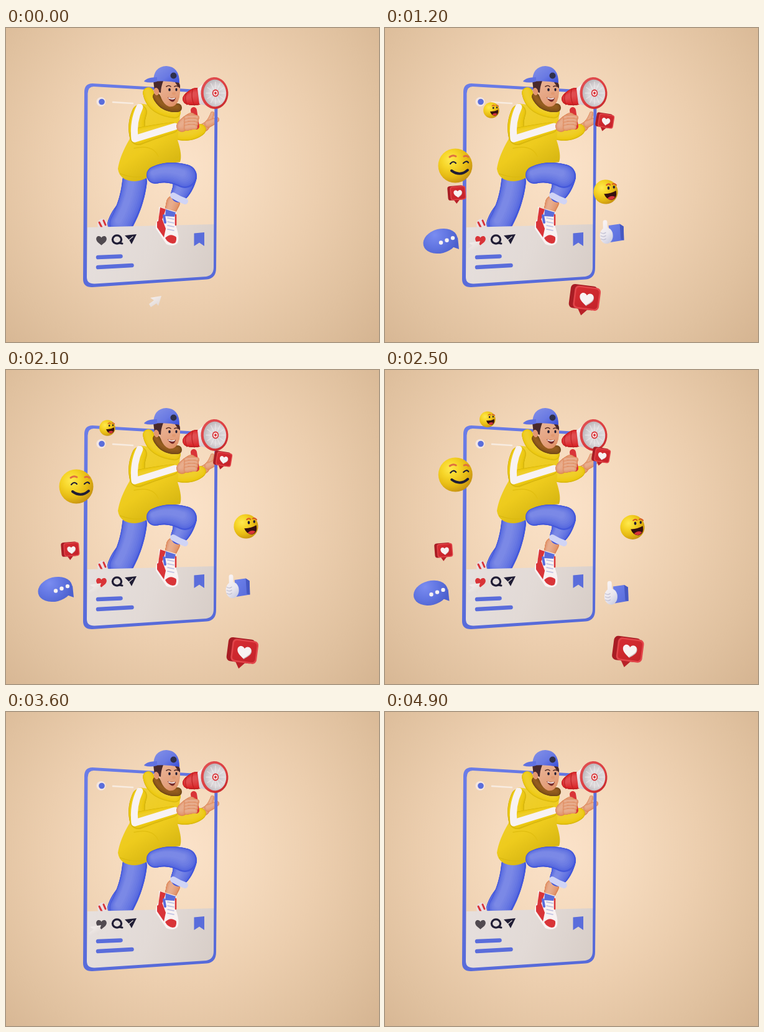
An HTML page with a canvas for the animation above (5000 ms loop, 600 by 504 pixels).

```html
<!DOCTYPE html>
<html lang="en">
<head>
<meta charset="utf-8">
<title>Social media promoter</title>
<style>
html, body { margin: 0; width: 100%; height: 100%; overflow: hidden; background: #ecd0ae; }
canvas { display: block; width: 600px; height: 504px; }
</style>
</head>
<body>
<canvas id="stage" width="600" height="504"></canvas>
<script>
const stage = document.getElementById('stage');
const ctx = stage.getContext('2d');
const LOOP = 5000, STEP = 100;
const BLUE = '#5a6ddb', INK = '#201d35', RED = '#d93438', WHITE = '#f8f2f2';
const HEART = 'M0 -4 C-2 -9 -10 -8 -9 -1 C-8 4 -3 6 0 9 C3 6 8 4 9 -1 C10 -8 2 -9 0 -4Z';

// Materials: hue, saturation, shaded and lit lightness
const DENIM = [232, 68, 54, 70], CLOTH = [50, 86, 44, 56], SKIN = [21, 66, 58, 74], PLASTIC = [359, 70, 42, 60];

const clamp = v => Math.max(0, Math.min(1, v));
const easeOut = v => 1 - (1 - clamp(v)) ** 3;
const tone = ([hue, sat, dark, lit], k) => `hsl(${hue} ${sat}% ${dark + (lit - dark) * k}%)`;

function fill(path, color) {
  ctx.fillStyle = color;
  ctx.fill(new Path2D(path));
}
function line(path, color, width) {
  ctx.strokeStyle = color;
  ctx.lineWidth = width;
  ctx.stroke(new Path2D(path));
}
function oval(x, y, rx, ry, color, turn = 0) {
  ctx.beginPath();
  ctx.ellipse(x, y, rx, ry, turn, 0, Math.PI * 2);
  ctx.fillStyle = color;
  ctx.fill();
}
function box(x, y, w, h, r, color) {
  ctx.beginPath();
  ctx.roundRect(x, y, w, h, r);
  ctx.fillStyle = color;
  ctx.fill();
}
function addStops(g, colors) {
  colors.forEach((c, i) => g.addColorStop(i / (colors.length - 1), c));
  return g;
}
const linear = (x0, y0, x1, y1, ...colors) => addStops(ctx.createLinearGradient(x0, y0, x1, y1), colors);
const radial = (x, y, r, ...colors) => addStops(ctx.createRadialGradient(x, y, 0, x, y, r), colors);
const lit = (material, x0, y0, x1, y1) => linear(x0, y0, x1, y1, ...[1, 0.7, 0].map(k => tone(material, k)));

function at(x, y, scale, turn, draw) {
  ctx.save();
  ctx.translate(x, y);
  ctx.rotate(turn);
  ctx.scale(scale, scale);
  draw();
  ctx.restore();
}

// Rounded limb lit from the upper left: discs swept along a curve, layer over layer
function limb(material, [x0, y0], [cx, cy], [x1, y1], r0, r1) {
  const layers = 8, steps = 24;
  for (let i = 0; i < layers; i++) {
    const k = i / layers, color = tone(material, 0.15 + 0.85 * Math.sqrt(k));
    for (let j = 0; j <= steps; j++) {
      const s = j / steps, q = 1 - s, r = r0 * q + r1 * s;
      oval(q * q * x0 + 2 * q * s * cx + s * s * x1 - k * r * 0.25,
        q * q * y0 + 2 * q * s * cy + s * s * y1 - k * r * 0.3, r * (1 - k * 0.85), r * (1 - k * 0.85), color);
    }
  }
}

function backdrop() {
  ctx.fillStyle = radial(285, 220, 440, '#fbe2c9', '#f5dabd', '#ecceae', '#e0c19f', '#d3b28f');
  ctx.fillRect(0, 0, 600, 504);
}

function backLeg() {
  oval(155, 315, 8, 9, '#e9dfe2');
  line('M150 312 L154 320 M157 309 L160 316', RED, 3);
  limb(DENIM, [192, 290], [180, 300], [173, 314], 14, 10);
  limb(DENIM, [207, 246], [203, 282], [185, 314], 20, 19);
}

function phone() {
  fill('M131 320 L335 315 V387 Q335 399 323 401 L139 411 Q130 411 130 402Z',
    linear(140, 320, 325, 405, '#e6dfdd', '#e2dad6', '#d8cec8'));
  line('M172 119 L204 121', '#f8ece1', 2.5);
  oval(153, 118.5, 7.5, 7.5, '#f3e6e2');
  oval(154, 118.5, 4.8, 4.8, BLUE);

  oval(178.5, 339.5, 8.7, 8.2, INK);
  oval(178.5, 339.5, 5.4, 5, '#e3dcd9');
  line('M182 345 L187 346', INK, 3);
  fill('M191 333 L210 331 L202 347 L198 340Z', INK);
  line('M198 340 L204 335', '#d9d2d0', 1.3);
  fill('M302.5 329.5 L319 328 V350 L311 344.5 L302.5 350Z', BLUE);
  line('M148 368 L184.5 366.5 M148 384 L202.5 381', BLUE, 6.5);
}

function phoneFrame() {
  const outer = 'M139 89 L326 100 Q340.5 101 340.5 114 L338 385 Q338 402 323 403.5 L139 416 Q124 416.5 124 403 L126 103 Q126 89 139 89Z';
  const inner = 'M141 94 L324 104.5 Q335.5 105.5 335.5 115 L334 384 Q334 397 322 399 L143 410.5 Q130 411 130 400 L131.5 105 Q132 94 141 94Z';
  ctx.fillStyle = linear(124, 90, 340, 410, '#6b7de8', BLUE, '#566ad9');
  ctx.fill(new Path2D(outer + inner), 'evenodd');
}

function frontLeg() {
  limb(SKIN, [269, 280], [267, 286], [264, 294], 11, 9);
  limb(DENIM, [288, 238], [286, 256], [278, 267], 19, 13);
  limb(DENIM, [240, 236], [262, 228], [288, 238], 14, 19);
  line('M269 269 Q279 275 288 278', '#d0d4f5', 10);

  fill('M246 287 L274 295 L273 317 Q280 336 276 345 Q270 352 258 347 L241 322 Q240 312 246 304Z', WHITE);
  fill('M248 288 L257 291 L252 306 L245 310Z', RED);
  fill('M257 291 L273 296 L271 303 L256 302Z', BLUE);
  fill('M243 311 L251 306 L257 322 L254 336 L243 320Z', RED);
  fill('M256 337 Q265 328 274 336 Q275 346 268 346 Q260 345 256 337Z', RED);
  line('M254 301 L256 312', BLUE, 4);
  for (let y = 305; y < 328; y += 6) line(`M260 ${y} l10 2`, '#b9bde0', 1.6);
  line('M273 300 V316', RED, 2.5);
}

function farArm() {
  limb(SKIN, [318, 160], [328, 154], [332, 137], 7, 3);
  limb(SKIN, [325, 154], [333, 151], [339, 147], 6, 4);
  limb(CLOTH, [278, 170], [300, 174], [313, 163], 10, 9);
}

function torso() {
  fill('M214 121 Q200 150 199 178 Q183 205 180 226 Q183 246 208 246 Q230 244 240 227 Q256 217 280 215 Q284 204 276 180 L281 130Z',
    lit(CLOTH, 205, 140, 265, 236));
  line('M184 234 Q206 242 226 238 Q238 222 279 209', tone(CLOTH, 0.2), 1.5);
  line('M206 193 Q236 186 245 206', tone(CLOTH, 0.3), 1.5);
}

function head() {
  limb(CLOTH, [229, 104], [234, 132], [272, 136], 9, 9);
  limb([32, 65, 24, 36], [242, 110], [252, 130], [276, 128], 6, 7);
  fill('M245 84 L279 86 Q282 105 277 117 Q272 128 262 126 Q246 120 245 84Z', lit(SKIN, 258, 88, 285, 130));
  fill('M237 85 H253 Q249 95 249 104 L239 101Z', '#49292b');
  fill('M270 84 Q281 85 280 97 Q276 94 270 84Z', '#49292b');
  oval(242, 102, 4.2, 6, tone(SKIN, 0.5), -0.2);
  line('M258 94 q4 -3 7 0 M271 94 q3 -2 6 0', '#542b26', 1.6);
  oval(263, 99, 1.8, 2.6, INK);
  oval(274, 99, 1.6, 2.4, INK);
  oval(270, 105, 3, 2.3, tone(SKIN, 0.55));
  fill('M260 111 Q267 114 273 112 Q271 120 266 118 Q262 116 260 111Z', '#752a2a');
  line('M262 112.5 Q267 115 271 113', WHITE, 1.8);

  fill('M237 86 Q237 62 258 61 Q279 62 279 88 Q258 84 237 86Z', lit(DENIM, 246, 62, 270, 94));
  fill('M243 79 Q226 79 222 86 Q232 89 243 86Z', tone(DENIM, 0.55));
  oval(269.5, 76.5, 5, 5, '#30304b');
}

function nearArm() {
  limb(CLOTH, [215, 135], [207, 155], [213, 174], 12, 14);
  limb(CLOTH, [213, 174], [240, 166], [268, 160], 14, 9);
  line('M215 127 Q204 150 207 178 L272 158', WHITE, 11);
}

function megaphone() {
  line('M302 132 L306 158', RED, 10);
  limb(PLASTIC, [293, 114], [298, 112], [306, 110], 9, 14);
  line('M290 105 Q287 114 291 123 M300 99 Q297 112 303 124', tone(PLASTIC, 0.1), 1.3);
  fill('M308 97 L325 83 V125 L311 122Z', linear(305, 96, 320, 122, '#f6eff0', '#d5cbd0'));
  oval(335.5, 104.5, 22, 25.5, lit(PLASTIC, 315, 84, 365, 136), -0.06);
  oval(336, 104.5, 18.3, 21.7, radial(341, 106, 25, '#cbc8cb', '#dedadc', '#b9b4b8'), -0.06);
  for (let a = 0; a < Math.PI * 2; a += Math.PI / 6) {
    line(`M337 104.5 L${337 + 15 * Math.cos(a)} ${104.5 + 18 * Math.sin(a)}`, '#f1edef99', 1.4);
  }
  [5.2, 3.5, 1.9].forEach((r, i) => oval(337, 104.5, r, r * 1.15, i === 1 ? WHITE : RED));
}

function nearHand() {
  limb(SKIN, [283, 158], [288, 150], [298, 144], 9, 8);
  for (let i = 0; i < 4; i++) {
    limb(SKIN, [291, 145 + i * 5], [300, 143 + i * 5], [307 - i, 144 + i * 5], 5, 4);
  }
}

function ball(r) {
  oval(0, 0, r, r, radial(-r * 0.3, -r * 0.35, r * 1.5, '#ffe94f', '#f6d528', '#e6ba13', '#c28d12'));
}
function happyFace() {
  ball(27.5);
  line('M-9 -14 q5 -4 10 -1 M14 -15 q4 -2 7 1', '#e0703f', 3);
  line('M-8 -3 q5 -6 9 -1 M13 -4 q5 -5 8 -1', INK, 2.2);
  line('M-6 8 Q8 18 20 7', INK, 4);
}
function laughFace() {
  ball(20);
  line('M2 -11 q4 -3 6 0 M12 -12 q3 -2 6 2', '#d95b25', 2.2);
  oval(5, -6, 1.9, 2.7, INK);
  oval(14, -7, 1.7, 2.5, INK);
  fill('M-3 3 Q8 4 17 -1 Q19 12 9 14 Q0 13 -3 3Z', '#35100f');
  fill('M2 11 Q8 5 15 9 Q11 15 6 13Z', RED);
}
function badge() {
  box(-15, -13, 26, 23, 4, '#a81d24');
  fill('M-7 8 L-2 16 L5 8Z', '#b82128');
  box(-11, -12, 25, 22, 4, '#e2454a');
  box(-9.5, -10.5, 22, 19, 3, linear(-8, -12, 8, 11, '#d62d32', '#c4222a'));
  at(1.7, 0, 0.72, 0, () => {
    fill(HEART, '#cdbabd');
    ctx.translate(-0.8, -0.8);
    fill(HEART, WHITE);
  });
}
function speech() {
  fill('M15 8 L29 13 L27 -6Z', '#4c60cf');
  oval(-1, 0, 28, 19.5, radial(-10, -10, 40, '#7a8cf0', '#6276e2', '#4a5ecb'), -0.25);
  for (let i = 0; i < 3; i++) oval(i * 9.5, 2.5 - i * 3.7, 3.2, 3.2, WHITE);
}
function thumb() {
  fill('M-4 -11 L14 -13 L20 -9 V13 L-2 16Z', linear(-4, -10, 20, 12, '#6c80e9', BLUE));
  fill('M14 -13 L20 -9 V13 L15 12Z', '#4659c2');
  const hand = linear(-18, -9, 4, 16, WHITE, '#e9e6ee', '#c3c6dc');
  oval(-8, 5, 10.5, 13, hand);
  box(-13, -20, 7, 20, 3.5, hand);
  for (let i = 0; i < 3; i++) line(`M-17 ${i * 5} q5 3 8 0`, '#c0bfd2', 1.2);
}

// Curve through three points reached at 1200, 2100 and 3100 ms
function drift(p, q, r, t) {
  const a = (t - 1200) / 900, b = (t - 2100) / 1000;
  return p.map((v, i) => v + (q[i] - v) * a + ((r[i] - q[i]) - (q[i] - v) / 0.9) / 1.9 * 0.9 * a * b);
}

const floaters = [
  { draw: happyFace, scale: 1, turn: 0, path: [[113, 221], [113, 187], [114, 135]] },
  { draw: laughFace, scale: 0.64, turn: 0, path: [[171, 132], [163, 93], [174, 63]] },
  { draw: laughFace, scale: 0.98, turn: -0.06, path: [[355, 263], [386, 251], [414, 262]] },
  { draw: badge, scale: 1, turn: -0.08, path: [[116, 266], [104, 289], [77, 283]] },
  { draw: badge, scale: 1, turn: 0.16, path: [[354, 150], [349, 144], [348, 125]] },
  { draw: badge, scale: 1.68, turn: 0.13, path: [[322, 435], [381, 453], [389, 436]] },
  { draw: speech, scale: 1, turn: 0, path: [[90, 342], [80, 352], [65, 368]] },
  { draw: thumb, scale: 1, turn: -0.03, path: [[364, 328], [372, 348], [365, 376]] }
];

function cursor(t) {
  const enter = 1 - easeOut(t / 500), leave = Math.max(0, (t - 4000) / 400) ** 3;
  at(153 + 97 * (enter + leave), 342 + 88 * enter + 142 * leave, 1, 0, () =>
    fill('M0 0 L-18 3 L-12 7 L-20 13 L-17 18 L-8 12 L-5 16Z', linear(-15, 2, -7, 17, '#f3edeb', '#e1d9d6')));
}

ctx.lineCap = ctx.lineJoin = 'round';
[backdrop, backLeg, phone, farArm, phoneFrame, torso, frontLeg, head, nearArm, megaphone, nearHand].forEach(draw => draw());
const scene = document.createElement('canvas');
scene.width = stage.width;
scene.height = stage.height;
scene.getContext('2d').drawImage(stage, 0, 0);

function render(t) {
  ctx.drawImage(scene, 0, 0);
  const liked = t >= 600 && t < 3500;
  at(153.5, 340.5, 0.92, 0, () => fill(HEART, liked ? RED : '#514a50'));

  const size = easeOut((t - 600) / 500) * (1 - clamp((t - 3250) / 300) ** 2);
  if (size > 0) {
    for (const f of floaters) at(...drift(...f.path, t), f.scale * size, f.turn, f.draw);
  }
  cursor(t);
}

const start = performance.now();
function tick() {
  const t = (performance.now() - start) % LOOP;
  render(Math.floor(t / STEP) * STEP);
  requestAnimationFrame(tick);
}
tick();
</script>
</body>
</html>
```
